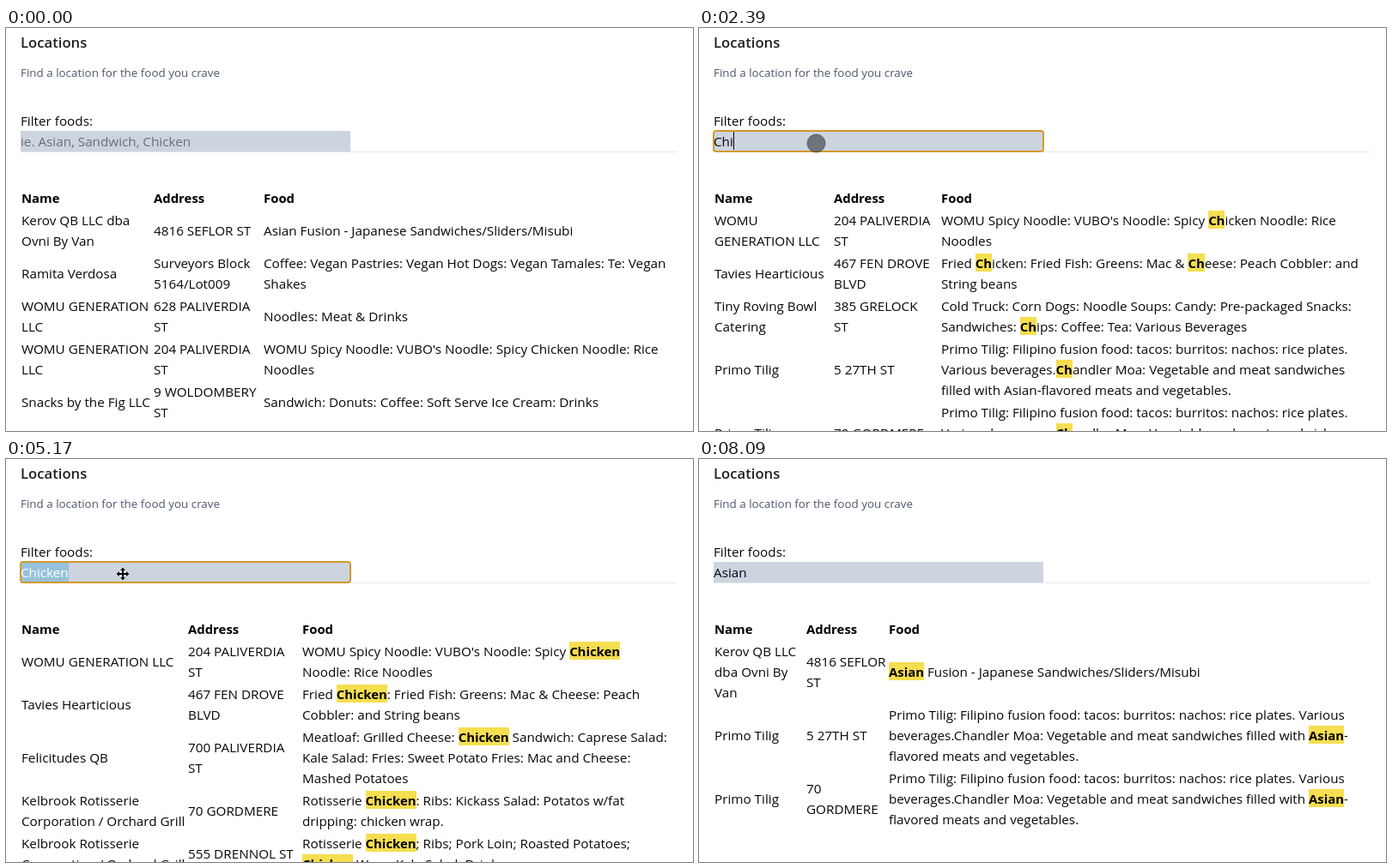
These frames come from a looping animation (800 px wide and 470 px high, 8160 ms). An HTML page:

```html
<!DOCTYPE html>
<html lang="en">
<head>
<meta charset="utf-8">
<title>Locations</title>
<style>
html, body { margin: 0; width: 100%; height: 100%; overflow: hidden; background: #fff; }
#stage { position: relative; width: 800px; height: 470px; overflow: hidden; color: #080808;
  font: 15.25px/24px "Open Sans", "Noto Sans", sans-serif; }
#stage > *, .cell { position: absolute; white-space: pre; }
h1 { margin: 0; left: 17px; top: 5px; font-size: 16.7px; font-weight: 600; line-height: 24px; color: #202024; }
.sub { left: 17px; top: 40px; font-size: 13.4px; color: #4b586b; }
.label { left: 17px; top: 96px; }
.rule { left: 17px; top: 144px; width: 764px; height: 1px; background: #e4e6ea; }
#field { left: 17px; top: 120px; width: 384px; height: 24px; background: #ccd4e0; }
#field .hint { color: #676e7a; }
#field .sel { display: inline-block; height: 24px; background: #97c2dc; color: #fff; }
#field i { display: inline-block; width: 1px; height: 21px; margin-top: 1px; background: #000; vertical-align: top; }
#ring { left: 16px; top: 119px; width: 382px; height: 22px; border: 2px solid #d5992a; border-radius: 4px; }
#table { left: 0; top: 0; }
b { font-size: 14.9px; font-weight: 700; color: #000; }
mark { padding-top: 1px; background: #f5de50; color: #000; font-size: 14.9px; font-weight: 700; }
#cursor { left: -15px; top: -15px; width: 30px; height: 30px; }
</style>
</head>
<body>
<div id="stage">
  <h1>Locations</h1>
  <div class="sub">Find a location for the food you crave</div>
  <div class="label">Filter foods:</div>
  <div class="rule"></div>
  <div id="field"></div>
  <div id="ring"></div>
  <div id="table"></div>
  <svg id="cursor" viewBox="-15 -15 30 30">
    <circle id="disc" r="10.4" fill="#46464a" fill-opacity=".68" stroke="#3c3c42" stroke-opacity=".5" stroke-width="1.2"/>
    <path id="cross" d="M0-7.5 3-4H1V-1H4V-3L7.5 0 4 3V1H1V4H3L0 7.5-3 4H-1V1H-4V3L-7.5 0-4-3V-1H-1V-4H-3Z"
      fill="#000" stroke="#fff" stroke-width="1" paint-order="stroke"/>
  </svg>
</div>
<script>
const LOOP = 8160, LINE = 24;
const $ = id => document.getElementById(id);

// Cells are [name, address, food]; "|" breaks a line.
const womu = ['WOMU GENERATION|LLC', '204 PALIVERDIA|ST', "WOMU Spicy Noodle: VUBO's Noodle: Spicy Chicken Noodle: Rice|Noodles"];
const ramita = ['Ramita Verdosa', 'Surveyors Block|5164/Lot009', 'Coffee: Vegan Pastries: Vegan Hot Dogs: Vegan Tamales: Te: Vegan|Shakes'];
const snacks = ['Snacks by the Fig LLC', '9 WOLDOMBERY|ST', 'Sandwich: Donuts: Coffee: Soft Serve Ice Cream: Drinks'];
const tavies = ['Tavies Hearticious', '467 FEN DROVE|BLVD', 'Fried Chicken: Fried Fish: Greens: Mac & Cheese: Peach Cobbler: and|String beans'];
const tiny = ['Tiny Roving Bowl|Catering', '385 GRELOCK|ST', 'Cold Truck: Corn Dogs: Noodle Soups: Candy: Pre-packaged Snacks:|Sandwiches: Chips: Coffee: Tea: Various Beverages'];
const kerov = ['Kerov QB LLC|dba Ovni By|Van', '4816 SEFLOR|ST', 'Asian Fusion - Japanese Sandwiches/Sliders/Misubi'];
const primo = 'Primo Tilig';
const fusion = 'Primo Tilig: Filipino fusion food: tacos: burritos: nachos: rice plates.|Various beverages.Chandler Moa: Vegetable and meat sandwiches|filled with Asian-flavored meats and vegetables.';
const fusionWide = 'Primo Tilig: Filipino fusion food: tacos: burritos: nachos: rice plates. Various|beverages.Chandler Moa: Vegetable and meat sandwiches filled with Asian-|flavored meats and vegetables.';
const grill = 'Kelbrook Rotisserie|Corporation / Orchard Grill';
const asianRows = [kerov, [primo, '5 27TH ST', fusionWide], [primo, '70|GORDMERE', fusionWide]];

const views = {
  all: { x: [172, 300], rows: [
    ['Kerov QB LLC dba|Ovni By Van', '4816 SEFLOR ST', kerov[2]],
    ramita,
    [womu[0], '628 PALIVERDIA|ST', 'Noodles: Meat & Drinks'],
    womu, snacks,
    [womu[0], '', '']] },
  c: { x: [172, 300], rows: [ramita, womu, snacks, tavies, tiny, [womu[0], '', '']] },
  ch: { x: [157, 282], rows: [
    ['WOMU|GENERATION LLC', womu[1], womu[2]], tavies, tiny,
    [primo, '5 27TH ST', fusion], [primo, '70 GORDMERE', fusion]] },
  chicken: { x: [212, 345], rows: [
    ['WOMU GENERATION LLC', womu[1], "WOMU Spicy Noodle: VUBO's Noodle: Spicy Chicken|Noodle: Rice Noodles"],
    [tavies[0], tavies[1], 'Fried Chicken: Fried Fish: Greens: Mac & Cheese: Peach|Cobbler: and String beans'],
    ['Felicitudes QB', '700 PALIVERDIA|ST', 'Meatloaf: Grilled Cheese: Chicken Sandwich: Caprese Salad:|Kale Salad: Fries: Sweet Potato Fries: Mac and Cheese:|Mashed Potatoes'],
    [grill, '70 GORDMERE', 'Rotisserie Chicken: Ribs: Kickass Salad: Potatos w/fat|dripping: chicken wrap.'],
    [grill, '555 DRENNOL ST', 'Rotisserie Chicken; Ribs; Pork Loin; Roasted Potatoes;|Chicken Wrap; Kale Salad; Drinks']] },
  as: { x: [132, 234], rows: [...asianRows,
    ['El Morvalo', '1400|PELLORIN ST', 'Tacos: Burritos: Quesadillas: Nachos Alambres: Choice of Meat: Carne Asada:|Carnitas: Pollo: Al Pastor Camarones']] },
  asia: { x: [128, 224], rows: asianRows },
  asian: { x: [125, 221], rows: asianRows }
};

// Each step changes part of the state at a time in ms.
const steps = [
  [0, { text: '', view: 'all', term: '', focus: 0, caret: 0, sel: 0 }],
  [930, { focus: 1 }],
  [1850, { text: 'C', caret: 1 }],
  [2190, { text: 'Ch', view: 'c', term: 'C' }],
  [2390, { text: 'Chi', view: 'ch', term: 'Ch' }],
  [2590, { text: 'Chic' }],
  [2660, { view: 'chicken', term: 'Chi' }],
  [2720, { text: 'Chick' }],
  [2790, { term: 'Chic' }],
  [2920, { text: 'Chicke' }],
  [3120, { term: 'Chick' }],
  [3380, { text: 'Chicken', term: 'Chicke' }],
  [3650, { term: 'Chicken' }],
  [3910, { caret: 0 }],
  [4180, { sel: 1 }],
  [5310, { text: 'A', sel: 0, caret: 1 }],
  [5440, { text: 'As' }],
  [5510, { view: 'as', term: 'A' }],
  [5580, { text: 'Asi' }],
  [5770, { text: 'Asia', term: 'As' }],
  [5900, { text: 'Asian' }],
  [5970, { view: 'asia', term: 'Asia' }],
  [6170, { view: 'asian', term: 'Asian' }],
  [6430, { caret: 0 }],
  [6900, { caret: 1 }],
  [7430, { caret: 0 }],
  [7890, { caret: 1 }],
  [8090, { caret: 0, focus: 0 }]
];

const cell = (x, y, html) => `<div class="cell" style="left:${x}px;top:${y}px">${html}</div>`;

function tableHtml({ x, rows }, term) {
  const cols = [18, ...x];
  let y = 212;
  let html = ['Name', 'Address', 'Food'].map((h, i) => cell(cols[i], 186, `<b>${h}</b>`)).join('');
  for (const row of rows) {
    const cells = row.map(c => c.split('|'));
    const tall = Math.max(...cells.map(c => c.length));
    cells.forEach((lines, i) => {
      let body = lines.join('\n');
      if (i === 2 && term) body = body.replaceAll(term, `<mark>${term}</mark>`);
      html += cell(cols[i], y + (tall - lines.length) * LINE / 2, body);
    });
    y += tall * LINE + 2;
  }
  return html;
}

function fieldHtml({ text, caret, sel }) {
  if (!text) return '<span class="hint">ie. Asian, Sandwich, Chicken</span>';
  return (sel ? `<span class="sel">${text}</span>` : text) + (caret ? '<i></i>' : '');
}

const enter = [[597, 462], [310, 384], [113, 272], [148, 180], [136.5, 124.5]];
const leave = [[148, 160], [300, 235], [570, 424]];

function along(points, p) {
  const s = Math.min(p, 1) * (points.length - 1);
  const i = Math.min(Math.floor(s), points.length - 2);
  return points[i].map((v, k) => v + (points[i + 1][k] - v) * (s - i));
}

function cursorAt(t) {
  if (t < 190 || t >= 7230) return null;
  if (t < 1190) return along(enter, Math.floor((t - 190) / 66.6) / 9);
  if (t < 1390) return [136.5, 126];
  if (t < 1455) return [136.5, 128];
  if (t < 6900) return [136.5, 134.5];
  return along(leave, Math.floor((t - 6900) / 82.5) / 3);
}

const crossTimes = [[1520, 1850], [3910, 4380], [5170, 5310]];

function drawCursor(t) {
  const at = cursorAt(t);
  $('cursor').style.display = at ? '' : 'none';
  if (!at) return;
  const cross = crossTimes.some(([a, b]) => t >= a && t < b);
  const [x, y] = cross ? [136, 134] : at;
  $('cursor').style.transform = `translate(${x}px,${y}px)`;
  $('disc').style.display = cross ? 'none' : '';
  $('cross').style.display = cross ? '' : 'none';
}

let shown = -1;

function draw() {
  const t = performance.now() % LOOP;
  const count = steps.filter(([at]) => at <= t).length;
  if (count !== shown) {
    shown = count;
    const state = Object.assign({}, ...steps.slice(0, count).map(s => s[1]));
    $('field').innerHTML = fieldHtml(state);
    $('ring').style.display = state.focus ? '' : 'none';
    $('table').innerHTML = tableHtml(views[state.view], state.term);
  }
  drawCursor(t);
  requestAnimationFrame(draw);
}
draw();
</script>
</body>
</html>
```
